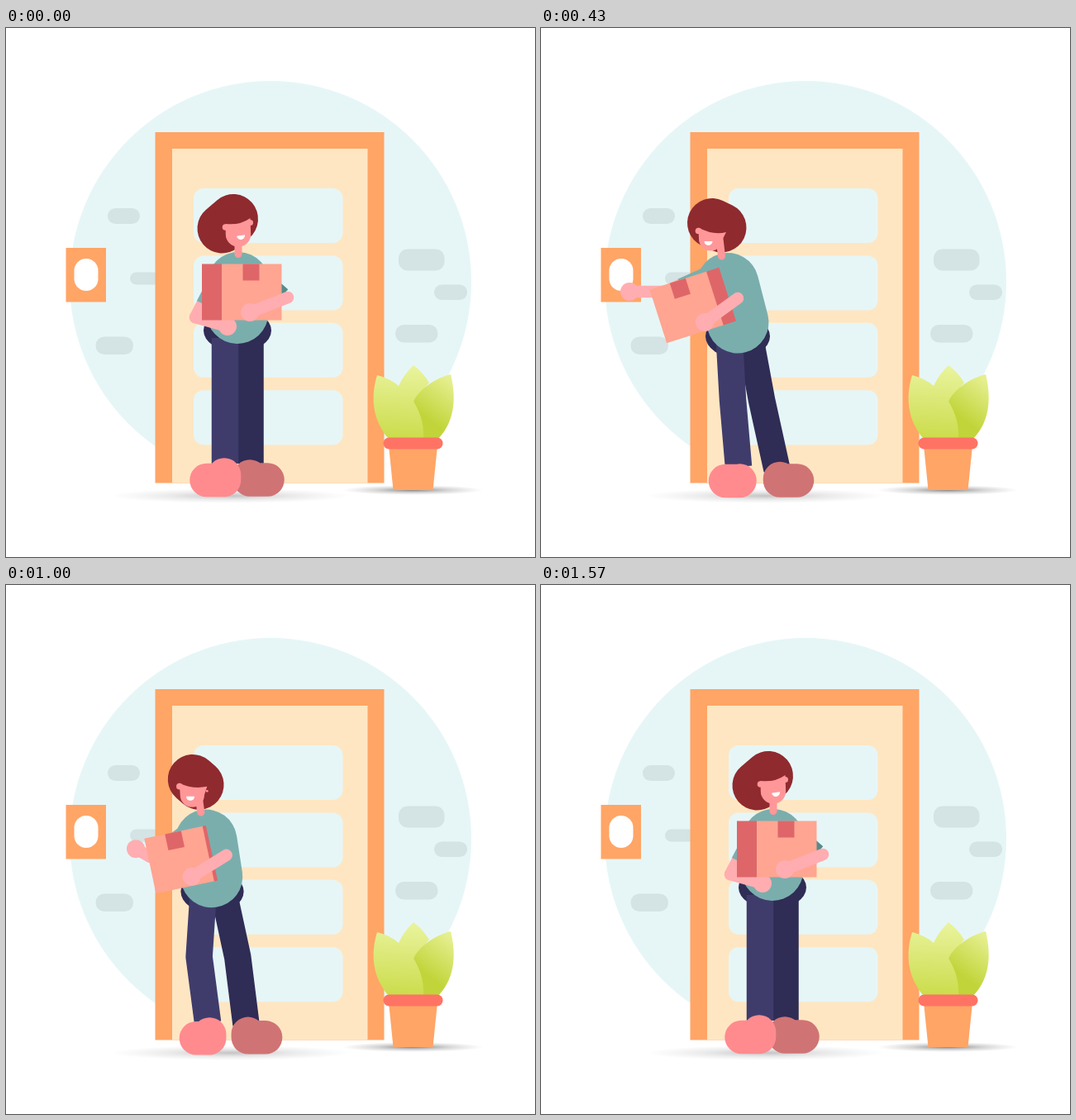
Write an HTML page with a canvas that moves like this. It is 640 by 640 pixels and loops after 3 s.

```html
<!DOCTYPE html>
<html lang="en">
<head>
<meta charset="utf-8">
<title>Parcel at the door</title>
<style>
html, body { margin: 0; height: 100%; overflow: hidden; background: #fff; }
canvas { display: block; width: 100vw; height: 100vh; }
</style>
</head>
<body>
<canvas id="stage" width="640" height="640"></canvas>
<script>
const ctx = document.getElementById('stage').getContext('2d');
const LOOP = 3000, FPS = 14;
const ORANGE = '#ffa566', SKY = '#e6f6f7', BRICK = '#d4e3e3', HAIR = '#8f2a2f',
  FACE = '#ff9799', SKIN = '#ffadb1', SHIRT = '#7aaead', SLEEVE = '#568b8a',
  PANTS = '#3f3c6c', PANTS_DARK = '#2f2c55', CARD = '#ffa591', TAPE = '#de6669',
  SHOE = '#ff8b8f', SHOE_DARK = '#d07374';

// Poses: points as x,y pairs; box = face corner, angle, visible side (left < 0 < right)
const stand = {
  hair: [275, 231, 261.5, 242.5],
  face: [265.5, 237, 283, 239, 295.5, 230, 281, 249.5, 15.2, 3.5],
  smile: [284, 251, -.15],
  neck: [281, 258, 281, 273.5],
  body: [281, 308.5, 280, 344.5],
  hip: [280, 366, 41],
  legL: [265, 375, 265, 450, 265, 527],
  legR: [295.5, 375, 295.5, 450, 295.5, 527],
  footL: [242.5, 547, 264, 540.5],
  footR: [316.5, 546.5, 295, 542.5],
  armL: [256, 298, 229, 350, 268, 361],
  armR: [302, 292, 341, 326, 295, 344],
  box: [261, 285.5, 0, -24]
};
const bend = {
  ...stand,
  hair: [280, 231, 287, 241],
  face: [262, 233, 276, 247, 296.5, 243, 274, 250, 13, 0],
  smile: [272.5, 251, .2],
  neck: [281, 255, 281, 273.5],
  body: [281, 308.5, 279, 344.5],
  hip: [278.5, 365, 37.5],
  legL: [263, 378, 242, 448, 257, 526],
  legR: [293, 375, 310, 450, 304, 526],
  footL: [247, 548.5, 261, 536.5],
  footR: [323, 547, 302, 538.5]
};
const reach = {
  hair: [207, 236, 218.5, 241.5],
  face: [190.5, 241.5, 208, 251, 224, 247, 205.5, 255, 14.5, 0],
  smile: [202.5, 258, 0],
  neck: [216, 255, 218.5, 276],
  body: [226, 309.5, 238, 356],
  hip: [238, 373, 39],
  legL: [228, 380, 232, 450, 239, 531],
  legR: [254, 380, 267, 450, 285.5, 534],
  footL: [223, 548, 240.5, 547.5],
  footR: [310, 547.5, 289, 545],
  armL: [208, 293, 150, 319, 107, 319],
  armR: [250, 305, 238, 327, 198, 356],
  box: [131.5, 316.5, -.308, 16]
};
const press = {
  hair: [200, 236.5, 212.5, 241.5],
  face: [183, 242, 200, 251, 217.5, 247, 198.5, 255.5, 14.5, 0],
  smile: [196, 259, 0],
  neck: [209, 258, 213, 276],
  body: [221.5, 309.5, 233.5, 357],
  hip: [234.5, 374, 38.5],
  legL: [225, 380, 231, 450, 238, 531],
  legR: [250.5, 380, 263.5, 450, 283, 534],
  footL: [222, 548, 239, 547.5],
  footR: [309, 547.5, 287.5, 545],
  armL: [205, 291, 146, 317, 103.5, 301],
  armR: [246, 306, 229.5, 328, 189.5, 358.5],
  box: [120, 319.5, -.322, 19]
};
const back = {
  hair: [270, 232, 266, 242],
  face: [257.5, 236, 273, 240.5, 288.5, 236, 273, 251, 15, 3.5],
  smile: [273, 251, 0],
  neck: [275.5, 258, 275.5, 273.5],
  body: [277, 308.5, 275.5, 345.5],
  hip: [275.5, 366, 37.5],
  legL: [261, 380, 241, 449, 256.5, 527],
  legR: [290, 376, 306, 450, 302, 527],
  footL: [243, 548.5, 259.5, 537.5],
  footR: [322, 547, 301, 539.5],
  armL: [252, 297, 222, 348, 252, 353],
  armR: [295, 292, 331.5, 325, 286, 344],
  box: [249.5, 286.5, -.02, -21]
};
const settle = {
  ...stand,
  hair: [275.5, 231, 264.5, 242],
  body: [281, 308.5, 279.5, 344.5],
  hip: [279, 366, 38.5],
  legL: [264, 378, 250.5, 447, 261, 526],
  legR: [294, 375, 305, 448, 300.5, 526],
  footL: [244, 548, 262.5, 539.5],
  footR: [320.5, 546.5, 300, 541]
};
const keys = [[0, stand], [3, bend], [6, reach], [8, press], [12.5, press],
  [16, back], [18, settle], [22, stand]];

// Smooth curve through all keys that never overshoots them
function poseAt(k) {
  const i = Math.max(1, keys.findIndex(([at]) => at >= k));
  const [k0, from] = keys[i - 1], [k1, to] = keys[i];
  const span = k1 - k0, u = (k - k0) / span, e = u * u * (3 - 2 * u);
  const pose = {};
  for (const part in from) {
    pose[part] = from[part].map((v, j) => {
      const slope = n => n < 0 || n > keys.length - 2 ? 0 :
        (keys[n + 1][1][part][j] - keys[n][1][part][j]) / (keys[n + 1][0] - keys[n][0]);
      const tangent = n => {
        const a = slope(n - 1), b = slope(n);
        return a * b > 0 ? 2 * a * b / (a + b) : 0;
      };
      return v + (to[part][j] - v) * e +
        span * u * (1 - u) * ((1 - u) * tangent(i - 1) - u * tangent(i));
    });
  }
  return pose;
}

function shape(color, build) {
  ctx.fillStyle = color;
  ctx.beginPath();
  build();
  ctx.fill();
}
const rect = (color, x, y, w, h, r = 0) => shape(color, () => ctx.roundRect(x, y, w, h, r));
const disc = (color, x, y, r, ry = r) => shape(color, () => ctx.ellipse(x, y, r, ry, 0, 0, 7));
const curve = (color, d) => { ctx.fillStyle = color; ctx.fill(new Path2D(d)); };

function line(color, width, pts, cap = 'round') {
  ctx.strokeStyle = color;
  ctx.lineWidth = width;
  ctx.lineCap = cap;
  ctx.lineJoin = 'round';
  ctx.beginPath();
  for (let i = 0; i < pts.length; i += 2) ctx.lineTo(pts[i], pts[i + 1]);
  ctx.stroke();
}

function at(x, y, angle, draw) {
  ctx.save();
  ctx.translate(x, y);
  ctx.rotate(angle);
  draw();
  ctx.restore();
}

function shadow(x, y, rx, ry, alpha) {
  at(x, y, 0, () => {
    ctx.scale(rx, ry);
    const g = ctx.createRadialGradient(0, 0, 0, 0, 0, 1);
    g.addColorStop(0, `rgba(70,70,70,${alpha})`);
    g.addColorStop(.5, `rgba(90,90,90,${alpha * .4})`);
    g.addColorStop(1, 'rgba(120,120,120,0)');
    disc(g, 0, 0, 1);
  });
}

function gradient(x0, y0, x1, y1, a, b) {
  const g = ctx.createLinearGradient(x0, y0, x1, y1);
  g.addColorStop(0, a);
  g.addColorStop(1, b);
  return g;
}

function scene(k) {
  rect('#fff', 0, 0, 640, 640);
  disc(SKY, 320, 307, 243);
  rect(BRICK, 123, 218, 39, 19, 9.5);
  rect(BRICK, 150, 295.5, 45, 15, 7.5);
  rect(BRICK, 108.5, 373.5, 45.5, 21.5, 10.5);
  rect(BRICK, 475, 267.5, 55.5, 26, 11);
  rect(BRICK, 518, 310.5, 40, 18.5, 9);
  rect(BRICK, 471, 359, 51.5, 21.5, 10.5);

  rect(ORANGE, 180.5, 126, 277, 424.5);
  rect('#ffe6c2', 201, 146, 236.5, 404.5);
  for (let i = 0; i < 4; i++) rect(SKY, 227, 194 + i * 81.4, 180.5, 66, 12);

  rect(ORANGE, 72.5, 266, 48.5, 65.5);
  rect('#fff', 82.5, 279, 29, 39, 14.5);
  if (k > 9 && k < 14) {
    ctx.strokeStyle = '#5b2b36';
    ctx.lineWidth = 1;
    ctx.stroke();
  }

  shadow(272, 566, 145, 9, .32);
  shadow(492, 559, 85, 6, .65);
  curve(gradient(480, 410, 475, 497, '#e9f39c', '#cbdc4b'),
    'M449 420Q465 424 475 433Q482 418 493 408Q504 416 512 429L493 452Q507 470 505 497H463C443 474 441 446 449 420Z');
  curve(gradient(536, 425, 504, 468, '#e5ef8f', '#c1d53a'),
    'M538 419C518 424 499 438 493 452Q506 472 505 497H523C545 474 544 443 538 419Z');
  curve(ORANGE, 'M463 505H522L516.5 559H468.5Z');
  rect('#ff7364', 456.5, 495.5, 72, 14, 7);
}

function foot(color, [tx, ty, bx, by]) {
  line(color, 40.5, [tx, ty, bx, ty, bx, by]);
}

function sleeve(color, [sx, sy, ex, ey], part) {
  line(color, 15, [sx, sy, sx + (ex - sx) * part, sy + (ey - sy) * part], 'butt');
}

function forearm([, , ex, ey, hx, hy]) {
  line(SKIN, 14.5, [ex, ey, hx, hy]);
  disc(SKIN, hx, hy, 11);
}

function parcel([x, y, angle, side]) {
  at(x, y, angle, () => {
    rect(CARD, 0, 0, 72.5, 68);
    rect(TAPE, 25.5, 0, 20, 20);
    if (side < 0) rect(TAPE, side, 0, -side, 68);
    else rect(TAPE, 72, 0, side, 68);
  });
}

function head({ hair, face, smile, neck }) {
  const [lx, ly, cx, cy, rx, ry, jx, jy, r, ear] = face;
  line(HAIR, 60, hair);
  line(FACE, 9, neck);
  disc(FACE, lx, ly + 4, 3.8);
  if (ear > 0) disc(FACE, rx, ry + 5.5, ear);
  shape(FACE, () => {
    ctx.moveTo(lx, ly);
    ctx.quadraticCurveTo(cx, cy, rx, ry);
    ctx.arc(jx, jy, r, 0, Math.PI);
  });
  at(smile[0], smile[1], smile[2], () =>
    shape('#fff', () => ctx.arc(0, 0, 5, 0, Math.PI)));
}

function person(p) {
  const [hx, hy, hr] = p.hip;
  disc(PANTS_DARK, hx, hy, hr, 26);
  line(PANTS_DARK, 32.5, p.legR, 'butt');
  line(PANTS, 32.5, p.legL, 'butt');
  foot(SHOE_DARK, p.footR);
  foot(SHOE, p.footL);
  sleeve(SLEEVE, p.armR, .88);
  line(SHIRT, 75, p.body);
  forearm(p.armL);
  const [sx, sy, ex, ey] = p.armL;
  line(SKIN, 14.5, [(sx + ex) / 2, (sy + ey) / 2, ex, ey]);
  sleeve(SHIRT, p.armL, .68);
  parcel(p.box);
  forearm(p.armR);
  head(p);
}

function note(x, y, size, alpha) {
  if (alpha <= 0) return;
  ctx.globalAlpha = alpha;
  at(x, y, 0, () => {
    ctx.scale(size, size);
    line('#8d879c', 1.6, [-5, 9, -10, -5, 8, -10, 10, 4]);
    disc('#8d879c', -6, 9.5, 2.4, 2);
    disc('#8d879c', 9, 4.5, 2.4, 2);
  });
  ctx.globalAlpha = 1;
}

function frame(now) {
  const t = now % LOOP;
  const k = Math.min(22, Math.floor((t + 4.3) * FPS / 1000));
  scene(k);
  person(poseAt(k));
  if (k > 14 && k < 19) {
    const n = k - 16;
    note(74 - 8 * n, 281 - 6 * n, .6 + .2 * n, .5 - .2 * n);
    note(129 + 7 * n, 277 - 6 * n, .8 + .2 * n, .2 - .2 * n);
  }
  requestAnimationFrame(frame);
}
requestAnimationFrame(frame);
</script>
</body>
</html>
```
